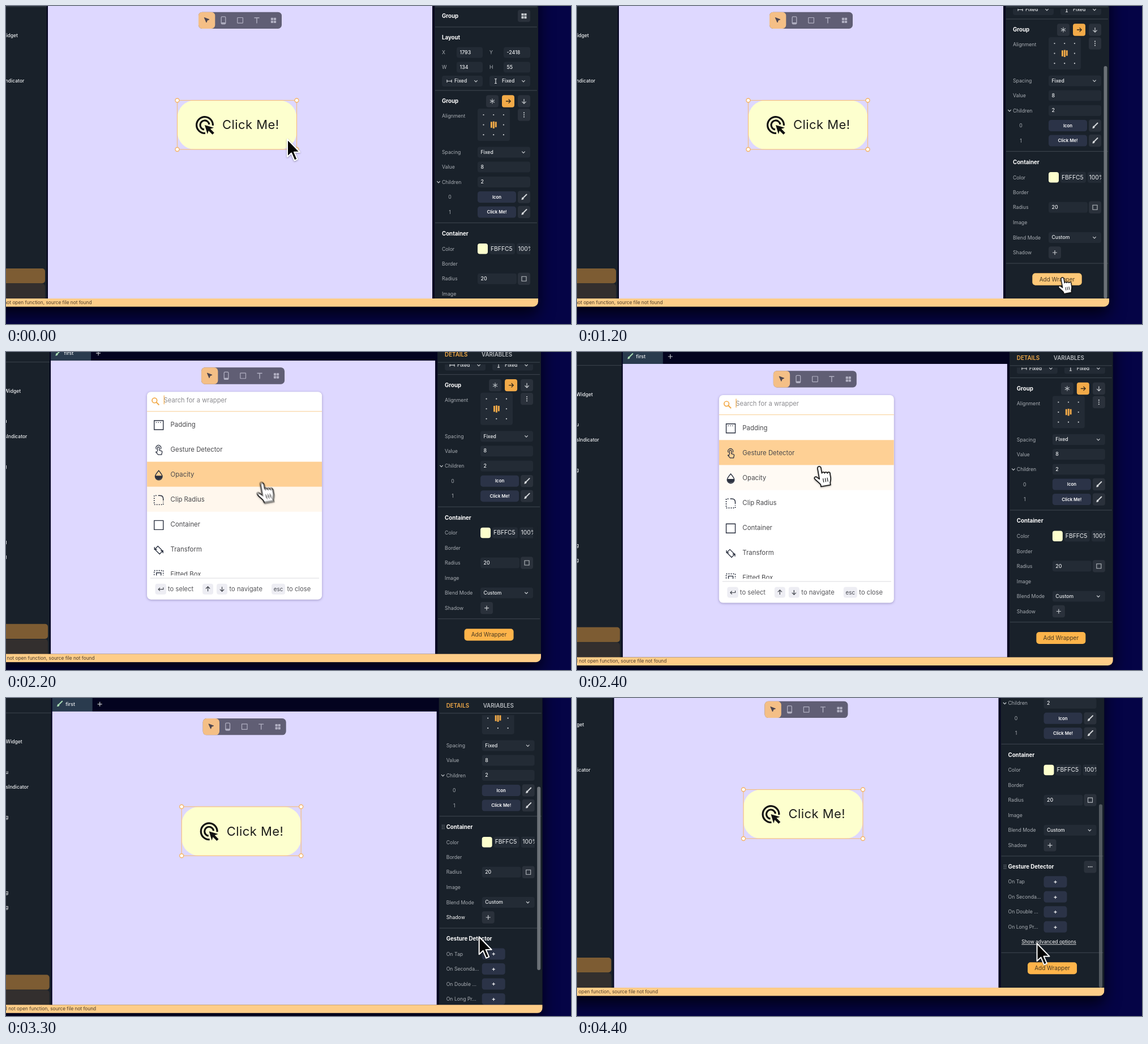
Recreate the animation shown at these times as an HTML page. Size 998 by 561 pixels, loop 4500 ms.

```html
<!DOCTYPE html>
<html lang="en">
<head>
<meta charset="utf-8">
<title>Gesture wrapper demo</title>
<style>
html, body { margin: 0; width: 100%; height: 100%; overflow: hidden; background: #05043f; }
svg { display: block; width: 998px; height: 561px; }
text { font-family: Inter, "Open Sans", sans-serif; white-space: pre; }
#pointer { isolation: isolate; }
#pointer > g { mix-blend-mode: plus-lighter; }
</style>
</head>
<body>
<svg id="stage" viewBox="0 0 998 561" xmlns="http://www.w3.org/2000/svg"></svg>
<script>
const LOOP = 4500, STEP = 100;
const PANEL = '#19212a', FIELD = '#232b35', CHIP = '#2b3347', BTN = '#2a313b';
const LABEL = '#a8adb3', VALUE = '#eef0f2', ORANGE = '#f2aa48';

// Drawing helpers
const rect = (x, y, w, h, fill, r = 0, more = '') =>
  `<rect x="${x}" y="${y}" width="${w}" height="${h}" rx="${r}" fill="${fill}" ${more}/>`;
const text = (s, x, y, size, fill, weight = 400, more = '') =>
  `<text x="${x}" y="${y + size * 0.36}" font-size="${size}" fill="${fill}" font-weight="${weight}" ${more}>${s}</text>`;
const line = (d, stroke, w = 1.2, more = '') =>
  `<path d="${d}" fill="none" stroke="${stroke}" stroke-width="${w}" ${more}/>`;
const shape = (d, fill, more = '') => `<path d="${d}" fill="${fill}" ${more}/>`;
const dot = (x, y, r, fill) => `<circle cx="${x}" cy="${y}" r="${r}" fill="${fill}"/>`;
const at = (x, y, body, more = '') => `<g transform="translate(${x} ${y})" ${more}>${body}</g>`;
const MID = 'text-anchor="middle"', END = 'text-anchor="end"';

// Right panel parts
const label = (s, y, id = '') => text(s, 770, y, 8.7, LABEL, 400, id && `id="${id}"`);
const title = (s, y) => text(s, 770, y, 9.7, '#fff', 700);
const rule = y => rect(758, y - 0.6, 180, 1.2, '#39414a');
const field = (s, x, y, w) => rect(x, y - 9.5, w, 19, FIELD, 4) + text(s, x + 5.5, y - 0.4, 8.8, VALUE, 500);
const chevron = (x, y) => line(`M${x - 2.7} ${y - 1.3}l2.7 2.7 2.7 -2.7`, '#c8ccd0');
const select = (s, x, y, w, pad = 5.5) =>
  rect(x, y - 9.5, w, 19, FIELD, 4) + text(s, x + pad, y - 0.2, 8.6, VALUE, 500) + chevron(x + w - 12, y);
const tile = (x, y, body, fill = BTN) => rect(x - 11, y - 10.7, 22, 21.4, fill, 4) + at(x, y, body);
const chip = (s, y, w, size = 7.8) =>
  rect(833, y - 10, w, 20, CHIP, 4.5) + text(s, 833 + w / 2, y, size, '#fff', 600, MID);
const grip = (y, id) => {
  let s = '';
  for (let i = 0; i < 6; i++) s += dot(763 + (i % 2) * 3, y - 3 + (i >> 1) * 3, 0.8, '#8a9097');
  return `<g id="${id}">${s}</g>`;
};
const blocks = c => [[-4.6, -4.6], [0.4, -4.6], [-4.6, 0.6], [0.4, 0.6]]
  .map(([x, y]) => rect(x, y, 4.2, 4.2, c, 0.7)).join('');
const brush = line('M4.5 -4.5L-0.5 0.5', '#d5d8db', 2, 'stroke-linecap="round"') +
  shape('M-1.6 0.2c-2 0 -2.4 1.6 -2.6 3.2 -0.1 0.7 -0.5 1 -1 1.1 2.6 0.9 5 -0.4 5 -2.6z', '#d5d8db');
const plus = line('M-4 0H4M0 -4V4', '#c8ccd0', 1.2);
const arrow = line('M-4 0H4M0.6 -3.6L4.2 0L0.6 3.6', 'currentColor', 1.3);

function panelBody() {
  let s = title('Group', 17.5) + tile(915, 17.5, blocks('#c4c8cc')) + rule(37) + title('Layout', 56);
  [['X', '1793', 'Y', '-2418', 82], ['W', '134', 'H', '55', 108]].forEach(([a, b, c, d, y]) => {
    s += label(a, y) + field(b, 796, y, 46) + text(c, 854, y, 8.7, LABEL) + field(d, 879, y, 47);
  });
  s += select('Fixed', 770, 132.5, 72, 22) + line('M779 130v5M787 130v5M779 132.5h8', '#d5d8db') +
    select('Fixed', 854, 132.5, 72, 22) + line('M863 128.5h4M863 136.5h4M865 128.5v8', '#d5d8db') + rule(149);

  s += title('Group', 168) +
    tile(859, 168, line('M0 -4.5V4.5M-4 -2.3L4 2.3M-4 2.3L4 -2.3', '#b8bdc2', 1.1)) +
    tile(887, 168, `<g color="#33281a">${arrow}</g>`, ORANGE) +
    tile(915, 168, `<g color="#c4c8cc" transform="rotate(90)">${arrow}</g>`);
  s += label('Alignment', 194) + rect(833, 181, 57, 57, FIELD, 4);
  for (let i = 0; i < 9; i++) if (i !== 4) s += dot(843.5 + (i % 3) * 17.7, 192 + (i / 3 | 0) * 17.6, 1.1, '#d0d3d6');
  s += rect(856, 204.3, 2.9, 10.5, ORANGE) + rect(859.9, 203.6, 2.9, 12.4, ORANGE) + rect(863.8, 204.3, 2.9, 9.5, ORANGE);
  s += tile(915, 192, [-3.6, 0, 3.6].map(y => dot(0, y, 1.1, '#c4c8cc')).join(''));
  s += label('Spacing', 258) + select('Fixed', 833, 258, 93) + label('Value', 284) + field('8', 833, 284, 93) +
    chevron(764, 310.5) + label('Children', 310.5) + field('2', 833, 310.5, 93);
  ['Icon', 'Click Me!'].forEach((name, i) => {
    const y = 337 + i * 26.5;
    s += text(i, 784, y, 8.7, LABEL, 400, MID) + chip(name, y, 68) + tile(915, y, brush);
  });

  s += rule(382.5) + grip(401.5, 'gripA') + title('Container', 401.5) +
    label('Color', 428.5) + rect(833, 419, 18, 18.5, '#fdffcd', 4) +
    rect(854, 418.5, 45, 19.5, FIELD, 4) + text('FBFFC5', 856, 427.8, 10.3, VALUE) +
    rect(902, 418.5, 30, 19.5, FIELD, 4) + text('100%', 904.5, 427.8, 10.3, VALUE) + rect(926, 417, 7, 23, PANEL) +
    label('Border', 455) + label('Radius', 481.3) + field('20', 833, 481.3, 69) +
    tile(915, 481.3, line('M-4 -4H4V4H-4Z', '#b8bdc2', 1.1)) +
    label('Image', 508) + label('Blend Mode', 534.4) + select('Custom', 833, 534.4, 93) +
    label('Shadow', 561, 'shadowLabel') + tile(844, 561, plus) + rule(580);

  let g = grip(599, 'gripB') + title('Gesture Detector', 599) +
    `<g id="more">${tile(915, 599, [-3, 0, 3].map(x => dot(x, 0, 1, '#d0d3d6')).join(''))}</g>`;
  ['On Tap', 'On Seconda...', 'On Double ...', 'On Long Pr...'].forEach((name, i) => {
    const y = 625.5 + i * 26.5;
    g += label(name, y, 'tap' + i) + chip('+', y, 41, 10.5);
  });
  g += text('Show advanced options', 842, 731.5, 8.5, LABEL, 400, `id="advanced" ${MID} text-decoration="underline"`) + rule(750.5);
  s += `<g id="gesture">${g}</g>`;
  s += `<g id="add">${rect(804.5, 597.5, 87, 21, '#feb44a', 5)}${rect(804.5, 597.5, 87, 21, '#fec878', 5, 'id="addHover"')}` +
    text('Add Wrapper', 848, 608, 10, '#493a22', 400, MID) + '</g>';
  return s;
}

// Wrapper search popup
const INK = '#2b3140';
const box = line('M-8 -8H8V8H-8Z', INK, 1.4);
const rows = [
  ['Padding', box + line('M-5 -4.6H6', INK, 1.3, 'stroke-dasharray="1.5 2.2"')],
  ['Gesture Detector', line('M-2.2 2V-4a1.7 1.7 0 0 1 3.4 0V0.5L5 1.6a1.6 1.6 0 0 1 1 1.9L5 8H-1L-5 3.6q0.8 -1.5 2.8 0', INK, 1.3) +
    line('M-4 -1.5A4.4 4.4 0 1 1 3.2 -1.5', INK, 1.2)],
  ['Opacity', line('M0 -8C4 -3.4 6.3 -0.6 6.3 2.4A6.3 6.3 0 0 1 -6.3 2.4C-6.3 -0.6 -4 -3.4 0 -8Z', INK, 1.4) +
    shape('M-6.3 1H6.3A6.3 6.3 0 0 1 -6.3 2Z', INK)],
  ['Clip Radius', line('M-1 -8H2Q8 -8 8 -2V1', INK, 1.5) +
    line('M-4 -8H-8V8H8V3', INK, 1.7, 'stroke-dasharray="1.8 2.2"')],
  ['Container', box],
  ['Transform', line('M-7 -1.5L-1.5 -7L7 1.5L1.5 7ZM-7.5 -5.5v4.3h4.3M7.5 5.5v-4.3h-4.3', INK, 1.3)],
  ['Fitted Box', line('M-8 -8H8V8H-8Z', INK, 1.7, 'stroke-dasharray="1.8 2.2"') + line('M-4 -4H4V4H-4Z', INK, 1.4)]
];
const ROW = 44.1;

function popupBody() {
  let list = '';
  rows.forEach(([name, icon], i) => {
    const y = 111 + i * ROW;
    list += rect(244, y - 22.3, 309, ROW, '#fed095', 0, `id="row${i}"`) +
      at(264.7, y + 1.3, icon) + text(name, 285.5, y, 11.4, '#4a4a4d');
  });
  const key = (x, w, body) => rect(x, 392, w, 19, '#ededf3', 4) + at(x + w / 2, 401.5, body);
  const hint = (s, x) => text(s, x, 401.5, 11.2, '#57575b');
  const upDown = a => `<g color="#44474f" transform="rotate(${a})">${arrow}</g>`;
  return rect(244, 53.5, 309, 366.5, '#fff', 7, 'style="filter:drop-shadow(0 1.5px 2px rgba(40,30,90,.35))"') +
    `<g clip-path="url(#listClip)">${list}</g>` +
    `<circle cx="257.3" cy="68.8" r="4.3" fill="none" stroke="${ORANGE}" stroke-width="1.7"/>` +
    line('M260.5 72L265.3 76.8', ORANGE, 2) +
    text('Search for a wrapper', 273.5, 68, 11.2, '#8c8c90') + rect(273.6, 60, 1.2, 15.5, ORANGE) +
    rect(244, 87.5, 309, 1.2, '#fad6a3') + rect(250, 381.8, 298, 1, '#dcdce0') +
    key(258.5, 19.5, line('M4.5 -3V0.5H-4M-1.4 -2.2L-4.2 0.5L-1.4 3.2', '#44474f', 1.2)) + hint('to select', 281) +
    key(342, 19, upDown(-90)) + key(367, 19, upDown(90)) + hint('to navigate', 389.5) +
    key(464, 24, text('esc', 0, 0, 9.8, '#44474f', 400, MID)) + hint('to close', 491.5);
}

function canvasBody() {
  const tool = '#b1b0c2';
  let s = rect(74, -1.5, 679, 517.5, '#ded8ff') + rect(340, 10.7, 147, 29.3, '#605e74', 6.5) +
    rect(340, 10.7, 29.3, 29.3, '#f4bf86', 6.5) +
    shape('M350.3 20.5L359 23.8L355.4 25.2L354 29Z', '#4d4650', 'stroke="#4d4650" stroke-linejoin="round"') +
    rect(380.2, 18.8, 7.6, 13, 'none', 1.5, `stroke="${tool}" stroke-width="1.3"`) + rect(380.2, 29, 7.6, 2.5, tool) +
    rect(408.8, 20.5, 9.6, 9.6, 'none', 0.5, `stroke="${tool}" stroke-width="1.2"`) +
    line('M438.5 20.8H447.5M443 20.8V30.5', tool, 1.4) + at(472.5, 25.3, blocks(tool));
  s += rect(302.5, 166.5, 211, 86.5, '#fdffce', 31) +
    `<g transform="translate(331.8 190.8) scale(1.6)">${
      line('M20.97 12.6A9 9 0 1 0 12.6 20.97M16.95 11.4A5 5 0 1 0 11.4 16.95', '#111', 2)}${
      shape('M12 12l10 3-3.77 1.26 4.28 4.26-1.98 1.98-4.27-4.27L15 22z', '#111')}</g>` +
    text('Click Me!', 382, 209.3, 22, '#1d1d1b', 400, 'letter-spacing=".45"') +
    rect(302.5, 166.5, 211, 86.5, 'none', 0, 'stroke="#f6bf80" stroke-width="1.2"');
  [302.5, 513.5].forEach(x => [166.5, 253].forEach(y => {
    s += `<circle cx="${x}" cy="${y}" r="3.5" fill="#fff" stroke="#f4b468" stroke-width="1.4"/>`;
  }));
  return s;
}

function leftBody() {
  const items = [['HomeWidget', 21, 52], ['Menu', -3.5, 105.5], ['ProgressIndicator', 32.3, 132],
    ['Heading', -3.5, 185], ['Spacing', -3.5, 318], ['Padding', -3.5, 344]];
  return rect(-40, -60, 112, 576, PANEL) + rect(-40, 0.5, 112, 1.1, '#39414a') +
    items.map(([s, x, y]) => text(s, x, y, 8.5, VALUE, 500, END)).join('') +
    rect(-20, 463, 89, 26.3, '#7d5c33', 5) + rect(-20, 490, 89, 30, '#332f2e', 5);
}

const HAND = 'M-3 3a3 3 0 0 1 6 0V12.5a2.6 2.6 0 0 1 4.9 .8a2.5 2.5 0 0 1 4.7 1a2.3 2.3 0 0 1 4.4 1.6V23c0 4-2 6-2.5 9v3.5H-2.5V32c-2-4-6-7.500-8.500-11.500c-1.500-3 2-5 4.500-2.200l3.500 3.700z';
const hand = `<g transform="rotate(-10)">${shape(HAND, '#fff', 'stroke="#111" stroke-width="1.7" stroke-linejoin="round"')}${
  line('M3.5 22v7M7.300 22v7M11 22v7', '#222', 1.3)}</g>`;
const pointer = shape('M0 0V31L7 24.500L12.500 37.500L17.500 35.300L12 22.700H22Z', '#050505',
  'stroke="#fff" stroke-width="2" stroke-linejoin="round"');
const COPIES = 5;

document.getElementById('stage').innerHTML = `
<defs>
  <clipPath id="viewClip"><rect x="757" y="5" width="183" height="511"/></clipPath>
  <clipPath id="listClip"><rect x="244" y="88" width="309" height="289.500"/></clipPath>
  <clipPath id="winClip"><rect x="-40" y="-60" width="980" height="590.500" rx="9"/></clipPath>
</defs>
${rect(0, 0, 998, 561, '#050446')}
<g id="world">
  ${rect(-40, -60, 980, 590.5, '#03031f', 9, 'style="filter:drop-shadow(0 14px 14px rgba(0,0,0,.75))"')}
  <g clip-path="url(#winClip)">
    ${leftBody()}
    ${rect(74, -40, 71, 38.5, '#2a3b4e')}
    <g transform="translate(87 -15)">${brush.replaceAll('#d5d8db', '#a9dcb4')}</g>
    ${text('first', 97.5, -14.5, 8.8, VALUE, 500)}${at(158, -14.5, plus)}
    ${canvasBody()}
    ${rect(757, -60, 183, 576, PANEL)}
    ${text('DETAILS', 770, -12, 9.8, ORANGE, 600)}${text('VARIABLES', 835, -12, 9.8, '#b6babf', 600)}${rule(1.5)}
    <g clip-path="url(#viewClip)"><g id="scroll">${panelBody()}</g></g>
    ${rect(930.5, 5, 6, 100, '#6b7177', 3, 'id="thumb"')}
    ${rect(-40, 516, 980, 15, '#fecd88')}
    ${text('Could not open function, source file not found', 151.5, 523, 8.3, '#4a3d2a', 400, END)}
  </g>
  <g id="popup">${popupBody()}</g>
  <g id="pointer" style="filter:drop-shadow(0 1px 1.500px rgba(0,0,0,.35))">${
    Array.from({ length: COPIES }, () =>
      `<g opacity="${1 / COPIES}"><g class="hand">${hand}</g><g class="arrow">${pointer}</g></g>`).join('')}</g>
</g>`;

// Time tables: [ms, value...]
const path = [[0, 497, 235], [100, 500, 237], [200, 530, 256], [300, 610, 304], [400, 710, 362], [500, 788, 402],
  [600, 824, 420], [900, 840, 438], [1050, 853, 470], [1200, 857, 479], [1700, 857, 479], [1800, 812, 466],
  [1900, 701, 425], [2000, 575, 345], [2100, 492, 264], [2200, 447, 214], [2400, 420.5, 179.5], [2600, 419, 173],
  [2700, 455, 195], [2800, 560, 262], [2900, 690, 335], [3000, 785, 382], [3100, 822, 395], [3300, 828, 396],
  [3500, 832, 394], [3700, 872, 366], [3850, 912, 352], [4000, 922, 368], [4150, 880, 412], [4300, 833, 434], [4400, 821, 438], [4500, 819, 439]];
const scrollKeys = [[650, 0], [700, 10], [800, 60], [900, 105], [1000, 122], [1100, 126],
  [3050, 126], [3150, 140], [3300, 199.3], [3400, 245], [3500, 280], [3600, 294], [3650, 296.2]];
const thumbKeys = [[650, 0], [720, 1], [1300, 1], [1450, 0], [2900, 0], [3050, 1], [3700, 1], [3900, 0], [4200, 0], [4400, 0.7]];
const popupKeys = [[1350, 0], [1550, 1], [2500, 1], [2650, 0]];
const addKeys = [[1050, 0], [1150, 1], [1500, 1], [1600, 0]];
const pressKeys = [[1100, 1], [1200, 0.81], [1300, 0.84], [1400, 1]];
const rowKeys = [
  [[1780, 1], [1880, 0]],
  [[2230, 0], [2380, 1]],
  [[2100, 0], [2200, 1], [2280, 1], [2400, 0.1], [2450, 0]],
  [[2050, 0], [2100, 1], [2220, 0]],
  [[1950, 0], [2000, 1], [2150, 0]],
  [[1800, 0], [1900, 0.85], [1950, 1], [2080, 0]],
  [[0, 0]]
];

function lerp(keys, t) {
  const i = keys.findIndex(k => k[0] > t);
  if (i === 0) return keys[0][1];
  if (i < 0) return keys[keys.length - 1][1];
  const [a, va] = keys[i - 1], [b, vb] = keys[i];
  return va + (vb - va) * (t - a) / (b - a);
}

// Smooth curve through the timed points, flat where the pointer rests
function curve(keys, t, c) {
  t = Math.min(Math.max(t, 0), LOOP - 1);
  const i = Math.max(1, keys.findIndex(k => k[0] > t));
  const slope = j => {
    const p = keys[j - 1], q = keys[j], n = keys[j + 1];
    if (!p || !n) return 0;
    const s = (q[c] - p[c]) / (q[0] - p[0]), e = (n[c] - q[c]) / (n[0] - q[0]);
    return s * e > 0 ? 2 * s * e / (s + e) : 0;
  };
  const a = keys[i - 1], b = keys[i], d = b[0] - a[0], u = (t - a[0]) / d, v = 1 - u;
  return a[c] * v * v * (1 + 2 * u) + b[c] * u * u * (3 - 2 * u) + d * u * v * (v * slope(i - 1) - u * slope(i));
}

const spring = ms => { const x = Math.max(0, ms) / 133; return 1 - (1 + x) * Math.exp(-x); };
const $ = id => document.getElementById(id);
const fade = (id, v) => $(id).setAttribute('opacity', v);
const tint = (id, on) => $(id).setAttribute('fill', on ? '#fff' : LABEL);
const move = (el, x, y, k = 1) => el.setAttribute('transform', `translate(${x} ${y}) scale(${k})`);
const copies = [...$('pointer').children];

function draw(t) {
  const inn = spring(t - 1900), out = spring(t - 3650);
  move($('world'), 7.7 * inn - 16.6 * out, 25.3 * inn - 31 * out);

  const added = t >= 2600, top = lerp(scrollKeys, t), view = 511, total = view + (added ? 296.2 : 126);
  move($('scroll'), 0, -top);
  move($('add'), 0, added ? 170 : 0);
  fade('gesture', added ? 1 : 0);
  $('thumb').setAttribute('y', 5 + top * view / total);
  $('thumb').setAttribute('height', view * view / total);
  fade('thumb', lerp(thumbKeys, t));
  fade('addHover', lerp(addKeys, t));

  fade('gripA', t >= 3000 && t < 3500 ? 1 : 0);
  fade('gripB', t < 3800 ? 0 : t < 4100 ? 0.4 : 1);
  fade('more', t >= 3700 ? 1 : 0);
  tint('shadowLabel', t >= 3200 && t < 3500);
  tint('tap3', t >= 3950 && t < 4200);
  tint('advanced', t >= 4200);

  fade('popup', lerp(popupKeys, t));
  rowKeys.forEach((keys, i) => fade('row' + i, lerp(keys, t)));

  const isHand = t >= 1050 && t < 2650, size = lerp(pressKeys, t);
  copies.forEach((g, i) => {
    const at = t + (i - (COPIES - 1) / 2) * 3.2;
    move(g, curve(path, at, 1), curve(path, at, 2), size);
    g.querySelector('.hand').style.display = isHand ? '' : 'none';
    g.querySelector('.arrow').style.display = isHand ? 'none' : '';
  });
}

const start = performance.now();
function tick() {
  const t = (performance.now() - start) % LOOP;
  draw(Math.floor(t / STEP) * STEP);
  requestAnimationFrame(tick);
}
tick();
</script>
</body>
</html>
```
